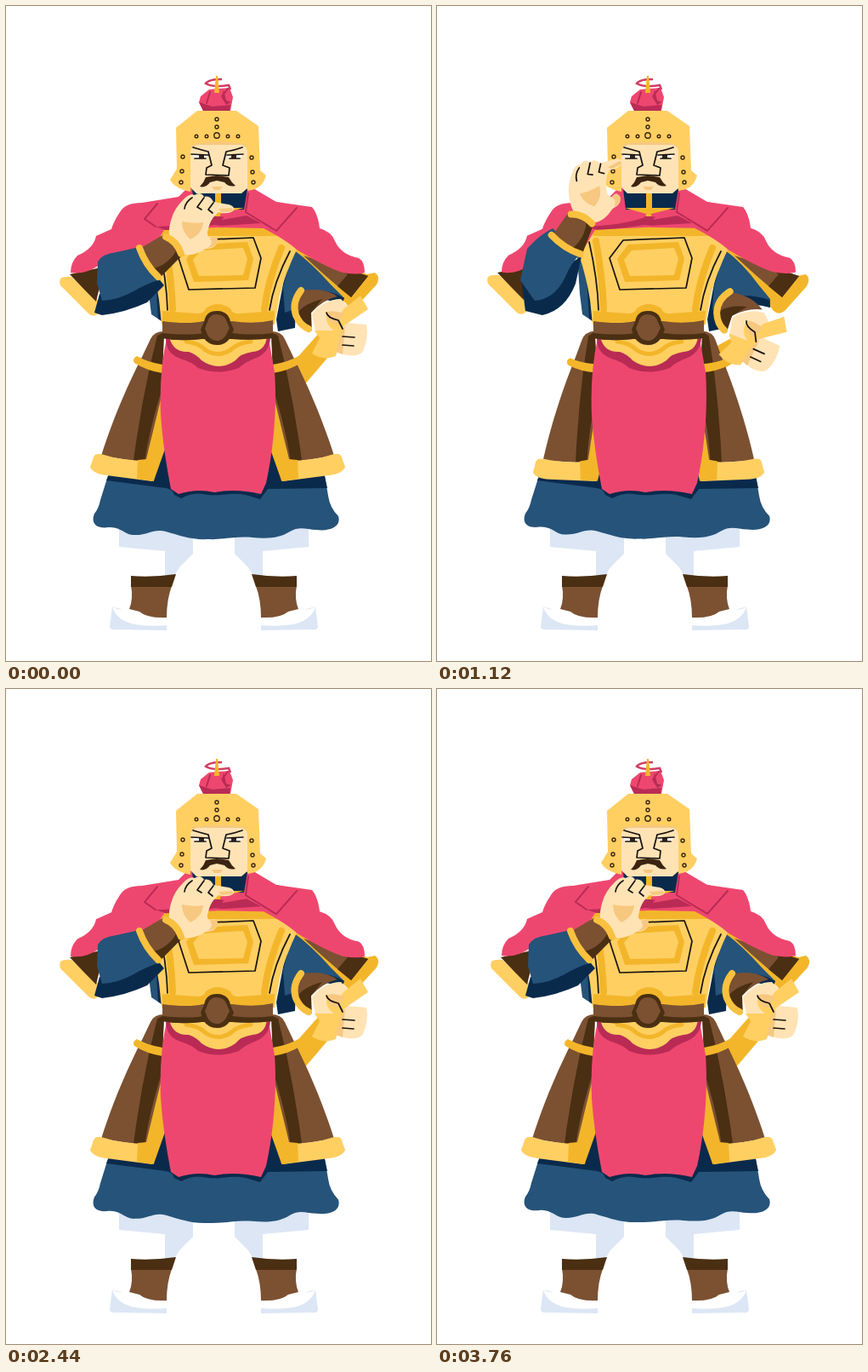
Animation, 500 px wide and 769 px high, one loop 3800 ms. Source, as an HTML page:

```html
<!DOCTYPE html>
<html lang="en">
<head>
<meta charset="utf-8">
<title>Armoured guard</title>
<style>
html,body{margin:0;width:100%;height:100%;overflow:hidden;background:#fff}
svg{display:block;width:500px;height:769px}
.y{fill:#ffcf62}.o{fill:#f3b62a}.p{fill:#ee476f}.r{fill:#b92b55}
.b{fill:#7b5132}.d{fill:#4a2f12}.u{fill:#265379}.n{fill:#0a2a4c}
.s{fill:#ffe3b5}.t{fill:#f7c880}.w{fill:#fff}.i{fill:#dce6f5}
.k,.yl,.ol,.rl{fill:none;stroke-linecap:round;stroke-linejoin:round}
.k{stroke:#17120f;stroke-width:1.7}
.yl{stroke:#f9c13f;stroke-width:8}
.ol{stroke:#f3b62a;stroke-width:5}
.rl{stroke:#b92b55;stroke-width:2}
</style>
</head>
<body>
<svg viewBox="0 0 500 769">
<defs>
 <g id="leg">
  <path class="i" d="M133 612H220V643L204 659 198 669H187V640L133 635Z"/>
  <path class="w" d="M134 637L187 641V668H147Z"/>
  <path class="i" d="M125 705L122 729Q123 733 130 732L189 733V724Z"/>
  <path class="w" d="M125 705Q135 712 147 705L162 714 190 716V727Q150 730 136 720Q127 714 125 705Z"/>
  <path class="b" d="M147 680L195 681Q189 697 189 718Q166 719 157 711L145 708Q150 696 147 680Z"/>
  <path class="d" d="M147 669Q172 671 200 667L195 682H147Z"/>
 </g>
 <g id="panel">
  <path class="o" d="M184 452L190 512 174 557 160 545Q174 490 184 452Z"/>
  <path class="b" d="M186 382Q174 382 170 391L160 412C141 449 124 490 112 528L164 536 183 458Z"/>
  <path class="d" d="M186 383L178 387 169 424Q157 480 150 534L163 536Q169 495 183 452Z"/>
  <path class="y" d="M107 526Q103 527 102 533L99 541Q102 549 118 551L172 558Q176 548 175 534Q139 535 112 526Z"/>
  <path class="o" d="M155 533L176 531 174 558 154 555Z"/>
  <path class="o" d="M154 411Q148 414 151 419Q165 428 184 431V421Q166 418 154 411Z"/>
 </g>
</defs>

<use href="#leg"/>
<use href="#leg" transform="matrix(-1 0 0 1 489 0)"/>

<g id="skirt">
 <path class="u" d="M122 545L111 580Q109 590 104 596C99 609 108 614 121 612C136 611 140 622 152 621C168 621 174 613 188 617C206 622 218 627 238 626C255 627 270 622 290 624C310 626 323 624 334 617C346 610 354 615 365 615C380 617 395 612 391 599Q381 589 379 575L374 545Z"/>
</g>
<path class="n" d="M186 430L184 512 172 550 122 548 118 557 188 566Q196 567 198 574L206 578Q220 571 232 573C250 577 265 570 282 574L299 579 308 567 378 566 374 548 324 552 310 512V430Z"/>

<!-- the scabbard hangs behind the side panel -->
<g class="sword"><path class="o" d="M370 382L395 393Q376 416 350 446L336 430 338 418Z"/></g>
<g id="panelL"><use href="#panel"/></g>
<g id="panelR"><use href="#panel" transform="matrix(-1 0 0 1 498 0)"/></g>
<path class="p" d="M189 390Q180 430 182 480C185 520 190 545 194 567L203 573Q225 566 245 571Q270 566 300 573L306 560C315 520 319 470 316 430L309 390Z"/>
<path class="r" d="M188 390Q188 408 205 414Q219 418 226 425Q250 434 274 425Q281 418 295 413Q310 406 311 390Z"/>
<path class="y" d="M192 388Q196 407 215 406Q224 409 230 416Q250 430 270 416Q276 408 290 406Q305 405 307 388Z"/>
<path class="ol" d="M212 394Q228 396 235 404Q249 413 264 404Q271 396 288 394"/>

<!-- arm holding the hilt -->
<path class="o" d="M338 284L425 315 434 313Q441 318 436 327L413 352Q405 357 400 349L344 298Z" data-to="M338 284L424 317 434 315Q440 320 435 329L409 358Q400 365 393 354L344 298Z"/>
<path class="b" d="M350 293L426 317 406 342Q375 317 350 293Z"/>
<path class="d" d="M385 304L426 317 406 342 390 329 402 315Z"/>
<path class="n" d="M330 305L318 368 320 382 340 378 342 330Z"/>
<path class="u" d="M338 286Q360 302 382 327L398 343 394 350 364 340Q342 340 337 357L328 360 326 330Z" data-to="M338 286Q360 302 378 327L392 344 392 354 350 342Q336 340 330 350L324 357 326 330Z"/>
<path class="n" d="M350 338Q375 329 398 343L395 350Q375 342 358 346Z" data-to="M331 347Q355 334 391 345L392 354Q360 346 334 352Z"/>

<!-- torso -->
<path class="u" d="M165 292L184 300 186 372 171 362 168 338Z"/>
<path class="n" d="M176 318L186 330V372L179 367Z"/>
<path class="y" d="M167 292L190 248H304L343 284Q328 315 322 340L316 374H183L180 345Q176 319 167 292Z"/>
<path class="ol" d="M187 276Q195 320 196 356M324 284Q308 322 304 356" style="stroke-width:8"/>
<path class="o" d="M186 255H310L320 270H183Z"/>
<path class="o" d="M184 358L225 361Q233 361 235 355Q249 345 264 355Q266 362 275 361L316 358 315 374H184Z"/>
<path class="k" d="M179 277Q189 321 190 357M334 288Q315 324 310 357"/>
<path class="k" d="M203 296L219 275 291 272 300 296 293 331 215 333Z"/>
<path class="o" d="M212 297L225 280 284 277 291 297 285 322 221 324Z"/>
<path class="y" d="M220 298L229 287 279 284 284 297 279 316 227 317Z"/>
<path class="b" d="M184 370Q215 374 232 370H266Q291 374 314 369V390Q290 393 266 391H230Q204 394 184 390Z"/>
<path class="d" d="M184 384Q215 387 232 384H266Q291 387 314 384V390Q290 393 266 391H230Q204 394 184 390Z"/>
<path class="d" d="M233 371Q235 358 248 358Q262 358 264 371L268 380 264 389Q259 398 248 398Q238 398 232 389L229 380Z"/>
<path class="b" d="M237 371Q239 362 248 362Q257 362 260 371L263 378 259 386Q255 393 248 393Q241 393 237 386L234 378Z"/>

<!-- cape and collar -->
<g id="cuffL">
 <path class="y" d="M64 320Q61 327 68 332L97 361Q103 367 110 360L114 349 103 342 77 318Q68 317 64 320Z"/>
 <path class="d" d="M75 315L116 306 106 347Q91 332 75 315Z"/>
</g>
<g id="cape">
 <path class="p" d="M217 210L203 224 160 231Q140 231 134 242Q127 252 124 262L106 270Q103 285 84 293Q76 301 76 313Q93 316 110 304L170 290 186 263 249 260 303 261Q330 275 342 286Q375 306 396 313Q414 316 422 313Q422 300 415 296Q394 292 387 276Q383 265 369 261Q367 244 360 236L318 230 284 210Z"/>
 <path class="r" d="M176 259Q215 258 245 248L246 257Q215 262 188 263ZM253 248L282 244 300 255 254 258Z"/>
 <path class="p" d="M284 212L300 226 346 236 318 264 283 246 254 251Z"/>
 <path class="rl" d="M163 250L178 232M163 250L176 259M285 220L282 242 318 264 342 237"/>
</g>
<path class="n" d="M219 215H284L280 239H222Z"/>
<path class="o" d="M221 237H246V218H253V237H280L252 244 253 253 245 254 246 244Z"/>
<path class="r" d="M244 247L254 247 254 258 244 257Z"/>

<!-- head -->
<path class="s" d="M217 158H285V213L277 220H224L217 213Z"/>
<path class="t" d="M217 158H285V168L278 163H224L217 168Z"/>
<path class="w" d="M219 174L238 175 235 180 222 179ZM279 174L260 175 262 180 275 179Z"/>
<path d="M227 174h6v5h-6zM265 174h6v5h-6z" fill="#33241a"/>
<path class="k" d="M220 166Q230 169 238 171L242 187 236 190 235 198 262 199 263 190 255 187 259 171Q270 169 278 166M218 174L238 175M260 175L279 174M222 179H235M263 179H275"/>
<path d="M228 212Q233 207 235 201L248 199 262 201Q265 207 270 211Q262 213 257 207L248 205 240 207Q235 214 228 212Z" fill="#3b2410"/>
<path class="t" d="M242 212H255L252 216H245Z"/>
<path class="y" d="M225 123H271L297 141 299 193 306 199Q302 215 284 217V170L281 162Q249 157 220 162L217 170V218Q198 214 193 204L201 191 200 143Z"/>
<g id="studs" fill="#ffcf62" stroke="#3b2410" stroke-width="1.4"></g>
<path class="p" d="M229 106L239 98 263 96 267 107 264 123H232L227 113Z"/>
<path class="r" d="M227 113L243 118 264 116 263 123H232ZM256 98L259 111 265 113 259 116 254 108Z"/>
<path class="rl" d="M240 101L236 114M254 106L261 97" stroke-width="1"/>
<path d="M254 86Q238 86 235 91Q244 96 262 93L264 98" fill="none" stroke="#d13c64" stroke-width="2.5"/>
<path class="o" d="M247 82H249L251 102H245Z"/>

<!-- raised arm -->
<path class="n" d="M110 338L150 333 178 318 186 328 166 348Q140 360 113 363L104 360Z" data-to="M99 320L140 330 160 300 170 294 163 326Q151 357 124 363L104 358Z"/>
<path class="u" d="M108 300Q113 291 130 289L157 283 182 321Q165 326 150 335Q132 345 113 346L107 325Z" data-to="M106 285Q117 273 126 267L136 261 168 292Q158 301 150 320Q138 344 115 346L98 322Z"/>
<g id="hand">
 <path class="b" d="M157 285L186 268 206 293 180 320Z"/>
 <path class="d" d="M174 308Q192 303 201 286L207 293 180 320Z"/>
 <path class="yl" d="M157 284Q164 304 179 318"/>
 <path class="s" d="M192 270Q191 260 195 249Q198 238 208 228Q216 219 222 222Q229 217 233 224Q240 222 244 230L262 233Q271 236 267 241Q260 245 250 242L244 248Q239 255 238 262Q235 269 240 272Q248 267 249 276Q247 285 235 285Q220 295 207 291Z"/>
 <path class="t" d="M207 253Q220 256 232 254Q231 267 217 274Q207 266 207 253ZM250 238L266 237 267 241 253 242ZM240 273Q248 267 249 276Q247 283 237 284Q245 278 240 273Z"/>
 <path class="k" d="M219 225Q211 230 210 238M233 225L225 236 230 239M244 231L238 239 243 243"/>
 <path class="yl" d="M188 271Q201 276 206 291"/>
</g>

<!-- sword hand -->
<g class="sword">
 <path class="b" d="M350 334Q374 330 390 341Q373 345 359 360L360 381Q346 376 342 360Q341 344 350 334Z"/>
 <path class="d" d="M343 360Q352 349 372 344L359 360V381Q347 376 343 360Z"/>
 <path class="yl" d="M347 334Q336 348 341 363Q346 375 356 379"/>
 <path class="s" d="M360 362Q374 344 394 344L404 354 402 372 424 374Q427 390 420 405Q416 412 401 410Q386 407 381 395L364 383Z"/>
 <path class="y" d="M417 340L426 356 398 375 395 388 388 411Q374 417 360 408L369 390 363 381 386 381Q374 373 378 361L392 364 397 356Z"/>
 <path class="t" d="M378 359Q386 357 398 361L391 374Q378 374 378 359ZM394 384L399 376 396 409 388 406Z"/>
 <path class="k" d="M377 360Q378 366 391 369L396 379M396 388L410 389M396 398L409 399"/>
</g>
</svg>
<script>
const LOOP = 3800;
const all = sel => [...document.querySelectorAll(sel)];
const nums = s => s.match(/-?[\d.]+/g).map(Number);

for (const [x, y, r] of [[248,133,2], [248,142,2], [248,152,3.2], [224,153,1.8], [236,153,1.8],
  [261,153,1.8], [273,153,1.8], [208,177,2], [207,194,2], [206,207,2], [289,178,2], [290,195,2], [291,207,2]]) {
  const c = document.createElementNS('http://www.w3.org/2000/svg', 'circle');
  c.setAttribute('cx', x); c.setAttribute('cy', y); c.setAttribute('r', r);
  document.getElementById('studs').append(c);
}

const morphs = all('[data-to]').map(el => {
  const d = el.getAttribute('d');
  return { el, d, a: nums(d), b: nums(el.dataset.to) };
});

const ease = u => (1 - Math.cos(Math.PI * Math.min(1, Math.max(0, u)))) / 2;
const turn = (sel, t) => all(sel).forEach(el => el.setAttribute('transform', t));

// Carry a joint from (x, y) by (dx, dy) while turning about it.
const swing = (sel, k, x, y, dx, dy, deg) =>
  turn(sel, `translate(${dx * k} ${dy * k}) rotate(${deg * k} ${x} ${y})`);

// Stretch slightly downwards from the line at y.
const billow = (sel, y, s) => turn(sel, `translate(0 ${y}) scale(1 ${1 + s}) translate(0 ${-y})`);

function draw(t) {
  const k = ease((t - 520) / 600) - ease((t - 1720) / 680);
  for (const m of morphs) {
    let i = 0;
    m.el.setAttribute('d', m.d.replace(/-?[\d.]+/g, () => {
      const v = m.a[i] + (m.b[i] - m.a[i]) * k;
      i++;
      return v.toFixed(2);
    }));
  }
  swing('#hand', k, 197, 281, -27, -31, -24);
  swing('.sword', k, 400, 388, -24, 16, 20);
  swing('#panelL', k, 180, 385, 0, 0, -5);
  swing('#panelR', k, 318, 385, 0, 0, 5);
  swing('#cuffL', k, 0, 0, -4, -2, 0);

  const sway = Math.sin(t / LOOP * Math.PI * 4);
  billow('#cape', 230, sway * .009);
  billow('#skirt', 560, sway * .014);
}

function tick() {
  draw(performance.now() % LOOP);
  requestAnimationFrame(tick);
}
tick();
</script>
</body>
</html>
```
